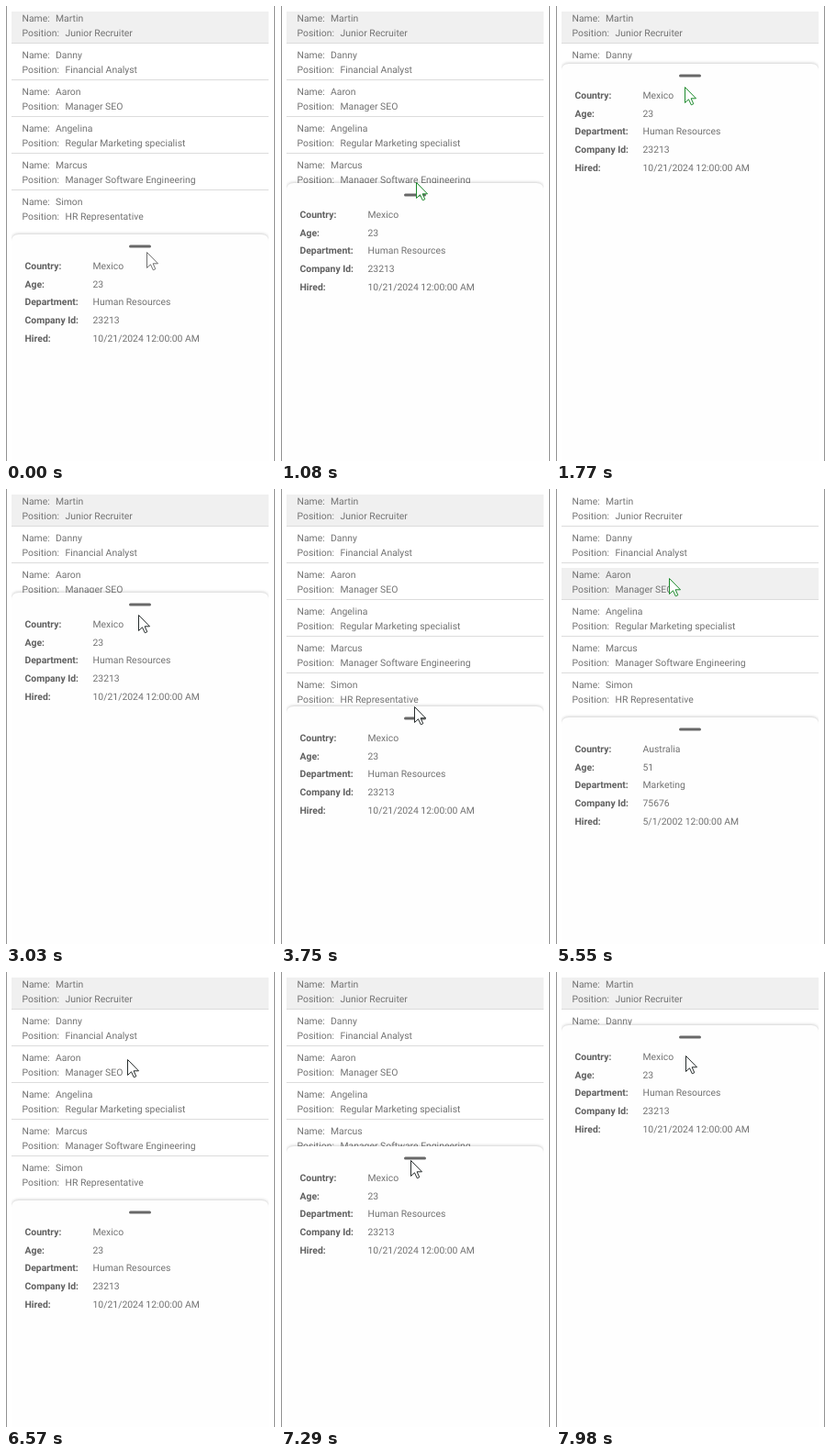
An HTML page that plays this animation: 293x496 px, repeating every 8000 ms.

```html
<!DOCTYPE html>
<html lang="en">
<head>
<meta charset="utf-8">
<title>Employee list with bottom sheet</title>
<style>
  html, body { margin: 0; width: 100%; height: 100%; overflow: hidden; background: #fff; }
  svg { display: block; width: 293px; height: 496px; }
  text { font: 10.4px Roboto, sans-serif; fill: #727272; text-rendering: geometricPrecision; }
  .label { font-weight: 700; fill: #606060; }
  #panel { filter: drop-shadow(0 -1px 1.5px rgba(0, 0, 0, .18)); }
</style>
</head>
<body>
<svg viewBox="0 0 293 496">
  <defs><clipPath id="view"><rect x="6" y="6" width="280" height="490"/></clipPath></defs>
  <rect width="293" height="496" fill="#fff"/>
  <path d="M.5 0V496M292.5 0V496" stroke="#929292"/>
  <g clip-path="url(#view)">
    <rect id="mark" x="6" width="280" height="34" fill="#f0f0f0"/>
    <g id="list"></g>
    <g id="sheet">
      <path id="panel" d="M6 500V8Q6 0 14 0H278Q286 0 286 8V500Z" fill="#fefefe"/>
      <rect x="134" y="11.5" width="24" height="3" rx="1.5" fill="#686868"/>
    </g>
  </g>
  <path id="cursor" d="M0 0V17L4 13.3L6.8 19.3L9.3 18.2L6.6 12.3H12Z" fill="#fff" stroke-linejoin="round"/>
</svg>
<script>
const LOOP = 8000, STEP = 30, ROW = 40, LOW = 249, HIGH = 54;
const $ = id => document.getElementById(id);

const people = [
  ["Martin", "Junior Recruiter"],
  ["Danny", "Financial Analyst"],
  ["Aaron", "Manager SEO"],
  ["Angelina", "Regular Marketing specialist"],
  ["Marcus", "Manager Software Engineering"],
  ["Simon", "HR Representative"],
  ["Sarah", "Accountant"]
];
const labels = ["Country:", "Age:", "Department:", "Company Id:", "Hired:"];
const details = {
  0: ["Mexico", "23", "Human Resources", "23213", "10/21/2024 12:00:00 AM"],
  1: ["Germany", "42", "Finance", "31847", "10/14/2016 12:00:00 AM"],
  2: ["Australia", "51", "Marketing", "75676", "5/1/2002 12:00:00 AM"],
  4: ["Canada", "34", "Development", "45120", "3/7/2011 12:00:00 AM"]
};

// Pointer glides: start, duration, destination
const glides = [
  [60, 60, 152, 265],
  [600, 1170, 140, 88],
  [1770, 500, 144, 58],
  [2460, 90, 144, 68],
  [2750, 280, 144, 137],
  [3030, 720, 145, 237],
  [3870, 330, 130, 181],
  [4650, 300, 122, 136],
  [5130, 120, 123, 97],
  [5550, 200, 125, 67],
  [5940, 200, 128, 24],
  [6390, 590, 141, 256],
  [6980, 1000, 141, 91]
];
const clicks = [4260, 5250, 5760, 6150];

const progress = (t, start, length) => Math.min(1, Math.max(0, (t - start) / length));
const mix = (a, b, p) => a + (b - a) * p;
const smooth = p => p * p * (3 - 2 * p);
const slowDown = p => 1 - (1 - p) ** 1.25;

function sheetTop(t) {
  if (t < 2750) return mix(LOW, HIGH, smooth(progress(t, 600, 1350)));
  if (t < 6980) return mix(HIGH, LOW, slowDown(progress(t, 2750, 1120)));
  return mix(LOW, 58, progress(t, 6980, 1000));
}

const pointer = t => glides.reduce(([x, y], [start, length, toX, toY]) => {
  const p = progress(t, start, length);
  return [mix(x, toX, p), mix(y, toY, p)];
}, [153, 268]);

// The selected row is the one under the pointer at the last click
function selectedRow(t) {
  const last = clicks.filter(c => c <= t).pop();
  return last ? Math.floor(pointer(last)[1] / ROW) : 0;
}

function ink(t) {
  const green = (t >= 600 && t < 2460) || (t >= 4500 && t < 5940);
  return green ? "#1c8a2c" : t < 600 ? "#707070" : "#262c2c";
}

function add(parent, tag, attrs, text = "") {
  const el = document.createElementNS("http://www.w3.org/2000/svg", tag);
  for (const k in attrs) el.setAttribute(k, attrs[k]);
  el.textContent = text;
  return parent.appendChild(el);
}

people.forEach(([name, job], i) => {
  const list = $("list"), y = i * ROW;
  add(list, "text", { x: 17.5, y: y + 16.7 }, "Name:");
  add(list, "text", { x: 54, y: y + 16.7 }, name);
  add(list, "text", { x: 17.5, y: y + 33 }, "Position:");
  add(list, "text", { x: 64.5, y: y + 33 }, job);
  if (i < 5) add(list, "path", { d: `M6 ${y + 40.5}H286`, stroke: "#dcdcdc" });
});

const values = labels.map((label, i) => {
  const y = 37.6 + i * 19.9;
  add($("sheet"), "text", { x: 20.5, y, class: "label" }, label);
  return add($("sheet"), "text", { x: 94.5, y });
});

function draw(time) {
  const t = Math.floor((time % LOOP) / STEP) * STEP;
  const [x, y] = pointer(t).map(v => Math.round(v) + .5);
  const row = selectedRow(t);
  $("mark").setAttribute("y", row * ROW + 6);
  values.forEach((el, i) => { el.textContent = details[row][i]; });
  $("sheet").setAttribute("transform", `translate(0 ${Math.round(sheetTop(t))})`);
  $("cursor").setAttribute("transform", `translate(${x} ${y})`);
  $("cursor").setAttribute("stroke", ink(t));
}

const start = performance.now();
function tick() {
  draw(performance.now() - start);
  requestAnimationFrame(tick);
}
tick();
</script>
</body>
</html>
```
